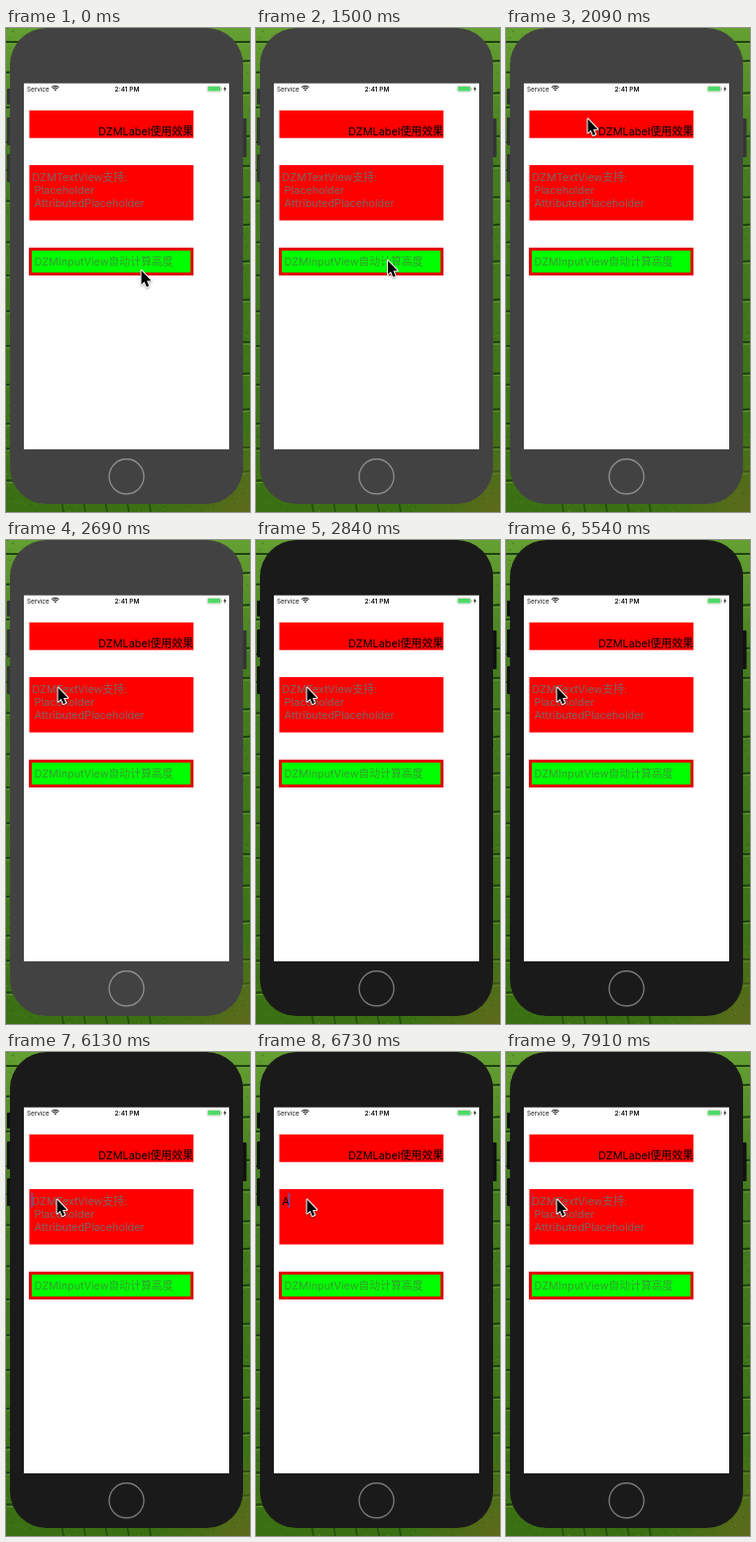
These frames come from a looping animation (246x487 px, 8000 ms). An HTML page with a canvas:

```html
<!DOCTYPE html>
<html lang="zh">
<head>
<meta charset="utf-8">
<style>
html, body { margin: 0; width: 100%; height: 100%; overflow: hidden; background: #3d7414; }
canvas { display: block; width: 246px; height: 487px; }
</style>
</head>
<body>
<canvas id="stage"></canvas>
<script>
const W = 246, H = 487, LOOP = 8000;
const RED = '#ff0000';
const FONT = 'Inter, "Noto Sans CJK SC", "Noto Sans CJK", sans-serif';
const MOVE_START = 1490, MOVE_STEP = 149, FOCUS_TIME = 2840;
// Focus, then a letter is typed and deleted in turn
const EDITS = [2990, 4040, 4790, 5830, 6130, 6730, 7320];
const POINTER_KEYS = [
  { step: 0, x: 136, y: 243.5 },
  { step: 5, x: 82, y: 91 },
  { step: 7, x: 78, y: 105 },
  { step: 9, x: 52, y: 148 },
  { step: 10, x: 51, y: 148 }
];

const canvas = document.getElementById('stage');
const ctx = canvas.getContext('2d');
const ratio = window.devicePixelRatio || 1;
canvas.width = W * ratio;
canvas.height = H * ratio;

const clamp = (v, lo, hi) => Math.min(hi, Math.max(lo, v));
const mix = (a, b, u) => a + (b - a) * u;
const ease = u => Math.pow(u * u * (3 - 2 * u), 1.2);

function seededRandom(seed) {
  return () => (seed = seed * 16807 % 2147483647) / 2147483647;
}

function rect(x, y, w, h, color) {
  ctx.fillStyle = color;
  ctx.fillRect(x, y, w, h);
}

function round(x, y, w, h, r, color) {
  ctx.fillStyle = color;
  ctx.beginPath();
  ctx.roundRect(x, y, w, h, r);
  ctx.fill();
}

function circle(x, y, r, color, width, from = 0, to = Math.PI * 2) {
  ctx.strokeStyle = color;
  ctx.lineWidth = width;
  ctx.beginPath();
  ctx.arc(x, y, r, from, to);
  ctx.stroke();
}

function text(str, x, y, color, size = 10.8, align = 'left', weight = 400) {
  ctx.font = `${weight} ${size}px ${FONT}`;
  ctx.textAlign = align;
  ctx.fillStyle = color;
  ctx.fillText(str, x, y);
}

function polygon(points) {
  ctx.beginPath();
  points.forEach(([x, y]) => ctx.lineTo(x, y));
  ctx.closePath();
}

function line(x1, y1, x2, y2, color, width) {
  ctx.strokeStyle = color;
  ctx.lineWidth = width;
  ctx.beginPath();
  ctx.moveTo(x1, y1);
  ctx.lineTo(x2, y2);
  ctx.stroke();
}

function drawFields() {
  const random = seededRandom(71);
  const g = ctx.createLinearGradient(0, 0, 0, H);
  g.addColorStop(0, '#65a032');
  g.addColorStop(0.25, '#457d1f');
  g.addColorStop(1, '#3a7013');
  rect(0, 0, W, H, g);
  // Terrace edges
  for (let y = 14; y < H; y += 24 + random() * 20) {
    const tilt = 18 * random();
    line(0, y, W, y - tilt, '#1d420c', 2);
    line(0, y + 2, W, y + 2 - tilt, '#6fa33a', 0.8);
  }
  // Furrows and dry ground along the bottom
  for (let x = 55; x < 165; x += 22) line(x, 470, x + 3, H, '#234c0e', 1.5);
  const dry = ctx.createRadialGradient(W, H, 0, W, H, 90);
  dry.addColorStop(0, '#5d6a1c');
  dry.addColorStop(1, 'rgba(93,106,28,0)');
  rect(150, 390, W - 150, H - 390, dry);
  // Leaf texture
  for (let i = 0; i < 2200; i++) {
    const shade = random() < 0.5 ? 'rgba(20,50,5,.28)' : 'rgba(130,185,65,.22)';
    rect(random() * W, random() * H, 1.5, 1, shade);
  }
}

function drawPhone(focused) {
  const button = focused ? '#111' : '#343434';
  for (const [x, y, h] of [[1, 61, 16], [1, 90, 28], [1, 127, 28], [238, 91, 39]]) {
    round(x, y, 4.5, h, 1, button);
  }
  round(4, 0, 235, 479, 37, focused ? '#1a1a1a' : '#424242');
  circle(121.5, 451.3, 17.5, focused ? '#777' : '#8c8c8c', 1.4);
  rect(18, 55.7, 207, 368.2, '#fff');
}

function drawStatusBar() {
  text('Service', 21, 63.5, '#111', 6.3);
  text('2:41 PM', 122, 63.5, '#111', 6.5, 'center', 600);
  for (let r = 1.2; r < 6; r += 2) {
    circle(49.7, 63.4, r, '#111', 1.1, -Math.PI * 0.75, -Math.PI * 0.25);
  }
  ctx.strokeStyle = '#aaa';
  ctx.lineWidth = 0.5;
  ctx.beginPath();
  ctx.roundRect(203, 58.4, 13.6, 5.8, 1.2);
  ctx.stroke();
  round(203.6, 59, 12.4, 4.6, 0.7, '#4cd964');
  rect(217.2, 60.3, 0.8, 2, '#aaa');
  polygon([[221.4, 58.2], [219.3, 61.7], [220.7, 61.7], [220.1, 64.5], [222.2, 60.8], [220.9, 60.8]]);
  ctx.fillStyle = '#111';
  ctx.fill();
}

function drawControls(typed, caret) {
  rect(23.5, 83, 165.5, 27.7, RED);
  text('DZMLabel使用效果', 189, 108, '#000', 10.9, 'right');

  rect(23.5, 138, 165.5, 55.6, RED);
  if (typed) {
    text(typed, 26.3, 153.5, '#000');
  } else {
    ['DZMTextView支持:', 'Placeholder', 'AttributedPlaceholder'].forEach((str, i) =>
      text(str, i ? 28.6 : 26.3, 153.5 + i * 13.1, '#7a6666'));
  }
  ctx.globalAlpha = caret;
  rect(typed ? 32.7 : 25.5, 142, 1.2, 14.5, '#4266d8');
  ctx.globalAlpha = 1;

  rect(23, 221, 166, 28, '#e00800');
  rect(26, 224, 160, 22, '#00ff00');
  text('DZMInputView自动计算高度', 28.5, 239, '#389a30');
}

function drawPointer({ x, y }) {
  ctx.save();
  ctx.translate(x, y);
  polygon([[0.5, 0.5], [0.5, 14.5], [3.6, 11.7], [5.8, 17], [8.2, 16], [6, 10.9], [10.3, 10.8]]);
  ctx.lineJoin = 'round';
  ctx.lineWidth = 2;
  ctx.strokeStyle = '#fff';
  ctx.shadowColor = 'rgba(0,0,0,.35)';
  ctx.shadowBlur = 2 * ratio;
  ctx.shadowOffsetY = ratio;
  ctx.stroke();
  ctx.shadowColor = 'transparent';
  ctx.fillStyle = '#000';
  ctx.fill();
  ctx.restore();
}

// The pointer advances in discrete steps along eased segments
function pointerAt(t) {
  const step = clamp(Math.floor((t - MOVE_START) / MOVE_STEP) + 1, 0, 10);
  const next = Math.max(1, POINTER_KEYS.findIndex(key => key.step >= step));
  const a = POINTER_KEYS[next - 1], b = POINTER_KEYS[next];
  const u = ease((step - a.step) / (b.step - a.step));
  return { x: mix(a.x, b.x, u), y: mix(a.y, b.y, u) };
}

// Each edit restarts the caret: lit, half faded, then dark
function editorAt(t) {
  const count = EDITS.filter(time => time <= t).length;
  const age = count ? t - EDITS[count - 1] : Infinity;
  const caret = age < 590 ? 1 : age < 745 ? 0.4 : 0;
  return { typed: count && count % 2 === 0 ? 'A' : '', caret };
}

function render(now) {
  const t = now % LOOP;
  const { typed, caret } = editorAt(t);
  ctx.setTransform(ratio, 0, 0, ratio, 0, 0);
  drawFields();
  drawPhone(t >= FOCUS_TIME);
  drawStatusBar();
  drawControls(typed, caret);
  drawPointer(pointerAt(t));
}

const start = performance.now();
function tick() {
  render(performance.now() - start);
  requestAnimationFrame(tick);
}
tick();
</script>
</body>
</html>
```
